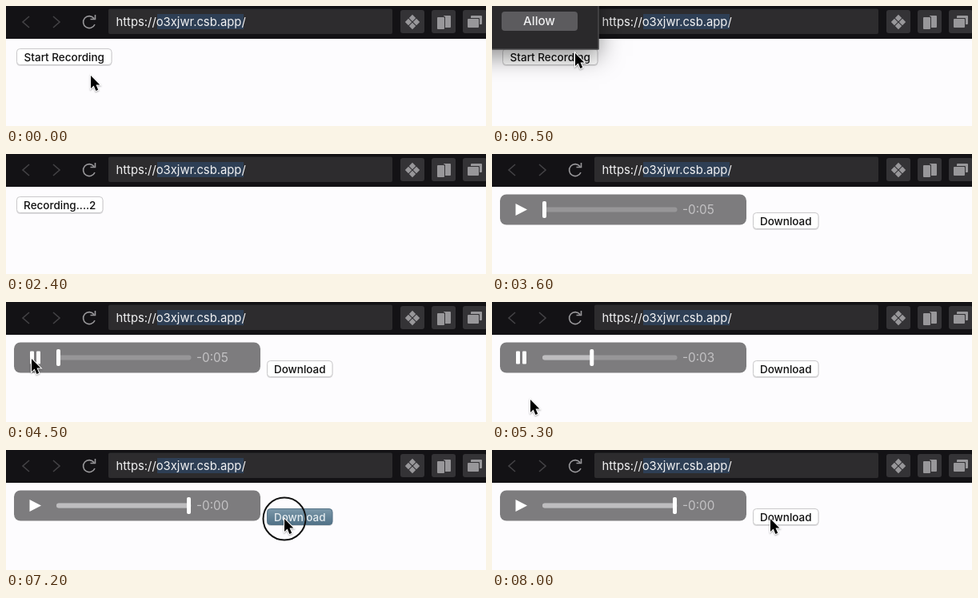
An HTML page with a canvas that plays this animation: 600x150 px, repeating every 8100 ms.

```html
<!DOCTYPE html>
<html lang="en">
<head>
<meta charset="utf-8">
<title>Audio recorder</title>
<style>
  html, body { margin: 0; width: 100%; height: 100%; overflow: hidden; background: #fdfcfe; }
  canvas { display: block; }
</style>
</head>
<body>
<canvas id="stage" width="600" height="150"></canvas>
<script>
const ctx = document.getElementById('stage').getContext('2d');
const LOOP = 8100, TICK = 100;
const RECORD_AT = 1600, COUNT = 400, PLAYER_AT = 3600;
const PLAY_START = 4500, PLAY_END = 6700;
const ICON = '#98979a', TILE = '#343336';

// Each move starts where the last one ended; press is how long the button is held on arrival
const home = { x: 106, y: 87 };
const moves = [
  { start: 100, end: 300, x: 104, y: 59, press: 100 },
  { start: 500, end: 800, x: 62, y: 20, press: 100 },
  { start: 900, end: 1300, x: -20, y: 112 },
  { start: 4000, end: 4100, x: 284, y: 16 },
  { start: 4100, end: 4400, x: 32, y: 71, press: 100 },
  { start: 4600, end: 5100, x: 48, y: 122 },
  { start: 6800, end: 7100, x: 348, y: 86, lift: 55, press: 200 }
];
const cursor = new Path2D('M0 0V16l3.7-3.4 2.7 6.4 2.8-1.2-2.7-6.2h4.8z');

const clamp = (v, lo, hi) => Math.min(hi, Math.max(lo, v));
const within = (t, from, to) => t >= from && t < to;
const smooth = u => u * u * (3 - 2 * u);

function box(x, y, w, h, r, fill, stroke) {
  ctx.beginPath();
  ctx.roundRect(x, y, w, h, r);
  ctx.fillStyle = fill;
  ctx.fill();
  if (stroke) {
    ctx.strokeStyle = stroke;
    ctx.lineWidth = 1;
    ctx.stroke();
  }
}

function text(str, x, y, size, fill, align = 'left', weight = 400) {
  ctx.font = `${weight} ${size}px Inter, sans-serif`;
  ctx.textAlign = align;
  ctx.fillStyle = fill;
  ctx.fillText(str, x, y);
}

function line(d, color, width) {
  ctx.strokeStyle = color;
  ctx.lineWidth = width;
  ctx.stroke(new Path2D(d));
}

function fillPath(d, color) {
  ctx.fillStyle = color;
  ctx.fill(new Path2D(d));
}

// Two overlapping cards, the front one offset by dx, dy
function cards(x, y, w, h, dx, dy) {
  box(x, y, w, h, 1, ICON);
  box(x + dx - 1, y + dy - 1, w + 2, h + 2, 1, TILE);
  box(x + dx, y + dy, w, h, 1, ICON);
}

function toolbar() {
  box(0, 0, 600, 41, 0, '#131215');
  line('M29 13l-8 7 8 7M59 13l8 7-8 7', '#434245', 1.6);
  line('M110 15.5A7.5 7.5 0 1 0 111 23M111.5 11v5.5h-6', ICON, 1.6);

  box(128, 3.5, 355, 31.5, 2, '#2d2c2e');
  box(189, 10, 108, 19, 0, '#2e3f55');
  text('https://o3xjwr.csb.app/', 137.5, 25, 14.8, '#f2f2f3');

  for (let i = 0; i < 3; i++) box(493 + 39 * i, 5, 30, 29, 3, TILE);
  for (const [dx, dy] of [[0, -5], [5, 0], [0, 5], [-5, 0]])
    fillPath(`M${508 + dx} ${15.8 + dy}l4.2 4.2-4.2 4.2-4.2-4.2z`, ICON);
  cards(547, 12, 9, 15, -8, 2);
  cards(581, 12, 14, 11, -4, 4);
}

function button(label, x, y, w, pressed) {
  let fill = '#fff';
  if (pressed) {
    fill = ctx.createLinearGradient(0, y, 0, y + 21);
    fill.addColorStop(0, '#7d99aa');
    fill.addColorStop(1, '#4f7086');
  }
  box(x, y + 1, w, 21, 4.5, 'rgba(0,0,0,.12)');
  box(x + 0.5, y + 0.5, w - 1, 20, 4, fill, pressed ? '#587589' : '#c9c8ca');
  text(label, x + w / 2, y + 16, 13.5, pressed ? '#e4ebef' : '#111', 'center', 500);
}

function popup() {
  ctx.save();
  ctx.shadowColor = 'rgba(0,0,0,.45)';
  ctx.shadowBlur = 28;
  ctx.shadowOffsetY = 8;
  box(-40, -40, 173.5, 94.5, 0, '#2a292b');
  ctx.restore();
  line('M133 0V54H0', '#59585a', 1);
  box(12, 7, 95, 24, 4, '#5c5b5e');
  text('Allow', 59, 24, 15.2, '#f0f0f1', 'center', 500);
}

function player(t) {
  const progress = clamp((t - PLAY_START) / (PLAY_END - PLAY_START), 0, 1);
  const thumb = 65.5 + 163 * progress;
  const left = Math.floor(5.04 * (1 - progress));

  box(10, 50.5, 308, 38, 8, '#7d7c7e');
  if (within(t, PLAY_START, PLAY_END)) {
    for (const x of [30, 38]) box(x, 61.5, 5, 16, 1, '#fff');
  } else {
    fillPath('M29.5 62l14.5 7.5-14.5 7.5z', '#fff');
  }
  box(63, 66.5, 168.5, 6, 3, '#979698');
  box(63, 66.5, thumb - 63, 6, 3, '#bebdbf');
  box(thumb - 2.5, 59, 5, 21, 2, '#fff');
  text('-0:0' + left, 238, 75, 15.3, '#c3c2c4');
}

function pointerAt(t) {
  let { x, y } = home, pressed = false;
  for (const m of moves) {
    if (t < m.start) break;
    const raw = clamp((t - m.start) / (m.end - m.start), 0, 1), u = smooth(raw);
    x += (m.x - x) * u;
    y += (m.y - y) * u - (m.lift || 0) * Math.sin(Math.PI * raw);
    pressed = within(t, m.end, m.end + (m.press || 0));
  }
  return { x, y, pressed };
}

function drawPointer({ x, y, pressed }) {
  ctx.save();
  ctx.translate(x, y);
  if (pressed) {
    ctx.beginPath();
    ctx.arc(0, 0, 26.5, 0, Math.PI * 2);
    ctx.strokeStyle = '#111';
    ctx.lineWidth = 2;
    ctx.stroke();
  }
  ctx.strokeStyle = '#fff';
  ctx.lineWidth = 2;
  ctx.shadowColor = 'rgba(0,0,0,.35)';
  ctx.shadowBlur = 2;
  ctx.shadowOffsetY = 1;
  ctx.stroke(cursor);
  ctx.shadowColor = 'transparent';
  ctx.fillStyle = '#000';
  ctx.fill(cursor);
  ctx.restore();
}

function draw(t) {
  const pointer = pointerAt(t);
  box(0, 0, 600, 150, 0, '#fdfcfe');
  toolbar();
  if (t < RECORD_AT) {
    button('Start Recording', 13, 53, 119.5, t < 400 && pointer.pressed);
  } else if (t < PLAYER_AT) {
    button('Recording....' + Math.floor((t - RECORD_AT) / COUNT), 13, 53, 108.5);
  } else {
    player(t);
    button('Download', 326, 73, 82.5, t > PLAY_END && pointer.pressed);
  }
  if (within(t, 400, 1000)) popup();
  if (!within(t, 1300, 4100)) drawPointer(pointer);
}

const start = performance.now();
function frame() {
  const t = (performance.now() - start) % LOOP;
  draw(Math.floor(t / TICK) * TICK);
  requestAnimationFrame(frame);
}
frame();
</script>
</body>
</html>
```
